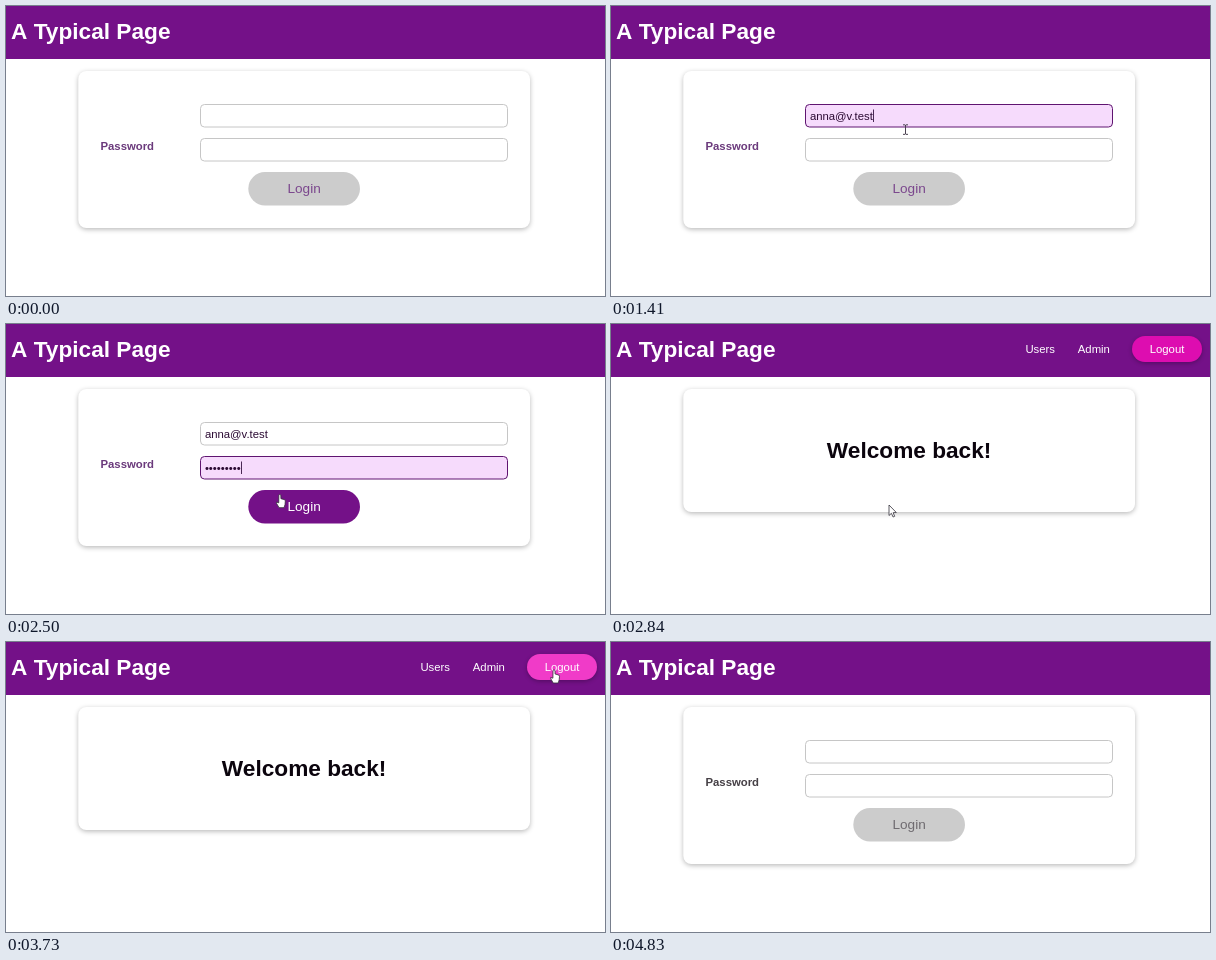
Recreate the animation shown at these times as an HTML page with a canvas. Size 599x290 px, loop 5.43 s.

```html
<!DOCTYPE html>
<html lang="en">
<head>
<meta charset="utf-8">
<title>A Typical Page</title>
<style>
  html, body { margin: 0; width: 100%; height: 100%; overflow: hidden; background: #fff; }
  canvas { display: block; }
</style>
</head>
<body>
<canvas id="stage" width="599" height="290"></canvas>
<script>
const ctx = document.getElementById('stage').getContext('2d');
const LOOP = 5430;
const FONT = '"Liberation Sans", Arial, sans-serif';
const PURPLE = '#741188';
const MAIL = 'anna@v.test';
const DOTS = 9;

// Number of the n screen updates between a and b that have happened by t.
function steps(t, a, b, n) {
  if (t < a) return 0;
  return Math.min(n, 1 + Math.floor((t - a + 3) / (b - a) * (n - 1)));
}

const easeOut = p => 1 - (1 - p) ** 2;
const easeBoth = p => p * p * (3 - 2 * p);

function curve(p, from, ctrl, to) {
  const q = 1 - p;
  return [0, 1].map(i => q * q * from[i] + 2 * q * p * ctrl[i] + p * p * to[i]);
}

function line(p, from, to) {
  return [0, 1].map(i => from[i] + (to[i] - from[i]) * p);
}

function text(str, x, y, size, color, weight = 'normal', align = 'left') {
  ctx.font = `${weight} ${size}px ${FONT}`;
  ctx.fillStyle = color;
  ctx.textAlign = align;
  ctx.fillText(str, x, y);
  return ctx.measureText(str).width;
}

function box(x, y, w, h, r, fill, stroke) {
  ctx.beginPath();
  ctx.roundRect(x, y, w, h, r);
  ctx.fillStyle = fill;
  ctx.fill();
  if (!stroke) return;
  ctx.strokeStyle = stroke;
  ctx.lineWidth = 1;
  ctx.stroke();
}

function shadowed(draw, blur = 5.7) {
  ctx.save();
  ctx.shadowColor = 'rgba(0,0,0,.28)';
  ctx.shadowBlur = blur;
  ctx.shadowOffsetY = 1.4;
  draw();
  ctx.restore();
}

function card(h) {
  shadowed(() => box(72.3, 65, 451.7, h, 8, '#fff'));
}

function field(y, value, focused) {
  box(194.5, y + .5, 307, 22.5, 4, focused ? '#f6dbfc' : '#fff', focused ? '#5f1470' : '#c6c6c6');
  const w = text(value, 198.9, y + 15.7, 11.33, '#2b0a33');
  if (!focused) return;
  ctx.fillStyle = '#4a2a55';
  ctx.fillRect(Math.round(198.9 + w), y + 5.5, 1, 12.5);
}

function loginPage(s) {
  card(157);
  text('Password', 94.5, 144.4, 11.33, s.returned ? '#464046' : '#6b3a7c', 'bold');
  field(98, s.mail, s.focus === 'mail');
  field(132, s.secret, s.focus === 'secret');
  const ready = s.secret.length > 6;
  box(242.3, 166, 111.7, 33.4, 16.7, ready ? PURPLE : '#ccc');
  const ink = ready ? '#fff' : s.returned ? '#6f6b70' : '#7b478d';
  text('Login', 298.1, 187, 13.6, ink, 'normal', 'center');
}

function welcomePage(s) {
  card(123);
  text('Welcome back!', 298.1, 134, 22.67, '#0b040d', 'bold', 'center');
  text('Users', 414.4, 29, 11.33, '#fff');
  text('Admin', 466.8, 29, 11.33, '#fff');
  shadowed(() => box(521, 12, 70, 26, 13, s.hover ? '#f03bc8' : '#dd0db0'), 4);
  text('Logout', 556, 29, 11.33, '#fff', 'normal', 'center');
}

function shape(points) {
  ctx.beginPath();
  points.forEach(([x, y]) => ctx.lineTo(x, y));
  ctx.closePath();
  ctx.fillStyle = '#fff';
  ctx.strokeStyle = '#33303a';
  ctx.lineWidth = .8;
  ctx.fill();
  ctx.stroke();
}

const pointers = {
  arrow() {
    shape([[0, 0], [0, 10.5], [2.4, 8.3], [4.1, 12], [5.7, 11.3], [4.1, 7.7], [7.3, 7.5]]);
  },
  beam() {
    ctx.fillStyle = '#4a4050';
    ctx.fillRect(-.5, -4.5, 1, 9.5);
    ctx.fillRect(-2.5, -5, 2, 1);
    ctx.fillRect(.5, -5, 2, 1);
    ctx.fillRect(-2.5, 4.5, 2, 1);
    ctx.fillRect(.5, 4.5, 2, 1);
  },
  hand() {
    shape([[-1, .5], [0, -.3], [1, .5], [1.1, 4], [4.8, 5], [5.5, 6.2], [5.2, 9.8],
      [4.2, 13], [-.8, 13], [-3.2, 8.8], [-3.3, 7.4], [-1.1, 8.2]]);
  }
};

function pointer(kind, [x, y], pressed) {
  if (pressed) {
    ctx.beginPath();
    ctx.arc(x - 1, y + .5, 8, 0, Math.PI * 2);
    ctx.fillStyle = 'rgba(250,230,90,.85)';
    ctx.fill();
  }
  ctx.save();
  ctx.translate(x, y);
  pointers[kind]();
  ctx.restore();
}

const MAIL_SPOT = [309, 110];
const SECRET_SPOT = [265.5, 150];
const LOGIN_SPOT = [278, 181];
const NEAR_LOGOUT = [540, 38];
const LOGOUT_SPOT = [548, 28];

function mouse(t) {
  const enter = steps(t, 70, 530, 8);
  const fill = steps(t, 1070, 1560, 8);
  const login = steps(t, 2370, 2910, 9);
  const travel = steps(t, 3040, 3520, 8);
  const reach = steps(t, 3590, 3730, 3);
  const leave = steps(t, 4330, 4830, 8);

  if (!enter || leave === 8) return null;
  if (leave) return ['arrow', curve(leave / 8, LOGOUT_SPOT, [530, 125], [568, 292])];
  if (t >= 4130) return ['arrow', LOGOUT_SPOT];
  if (reach) return ['hand', line(reach / 3, NEAR_LOGOUT, LOGOUT_SPOT), t >= 4060];
  if (travel) return ['arrow', line(easeOut(travel / 8), LOGIN_SPOT, NEAR_LOGOUT)];
  if (login > 5) return ['arrow', LOGIN_SPOT];
  if (login) {
    const p = Math.min(1, login / 3);
    return [p < .6 ? 'arrow' : 'hand', line(p, SECRET_SPOT, LOGIN_SPOT), login > 3];
  }
  if (fill > 4) return ['beam', line(Math.min(1, (fill - 4) / 3), MAIL_SPOT, SECRET_SPOT), fill === 7];
  if (enter === 8) return ['beam', MAIL_SPOT, t >= 670 && t < 738];
  return ['arrow', curve(easeBoth((enter - 1) / 7), [544, 279], [345, 175], MAIL_SPOT)];
}

function state(t) {
  const fill = steps(t, 1070, 1560, 8);
  const typed = steps(t, 1760, 2300, 8);
  const login = steps(t, 2370, 2910, 9);
  const returned = t >= 4130;
  const dots = typed && Math.round(1 + (typed - 1) * (DOTS - 1) / 7);
  let focus = null;
  if (t >= 670 && login < 4) focus = fill >= 7 ? 'secret' : 'mail';
  return {
    returned,
    focus,
    inside: login > 5 && !returned,
    hover: t >= 3590,
    mail: returned ? '' : MAIL.slice(0, Math.ceil(fill * 2.2)),
    secret: returned ? '' : '•'.repeat(dots)
  };
}

function draw(t) {
  const s = state(t);
  ctx.fillStyle = '#fff';
  ctx.fillRect(0, 0, 599, 290);
  ctx.fillStyle = PURPLE;
  ctx.fillRect(0, 0, 599, 53);
  text('A Typical Page', 5, 33, 22.67, '#fff', 'bold');
  (s.inside ? welcomePage : loginPage)(s);
  const m = mouse(t);
  if (m) pointer(...m);
}

const start = performance.now();
function tick() {
  draw((performance.now() - start) % LOOP);
  requestAnimationFrame(tick);
}
tick();
</script>
</body>
</html>
```
